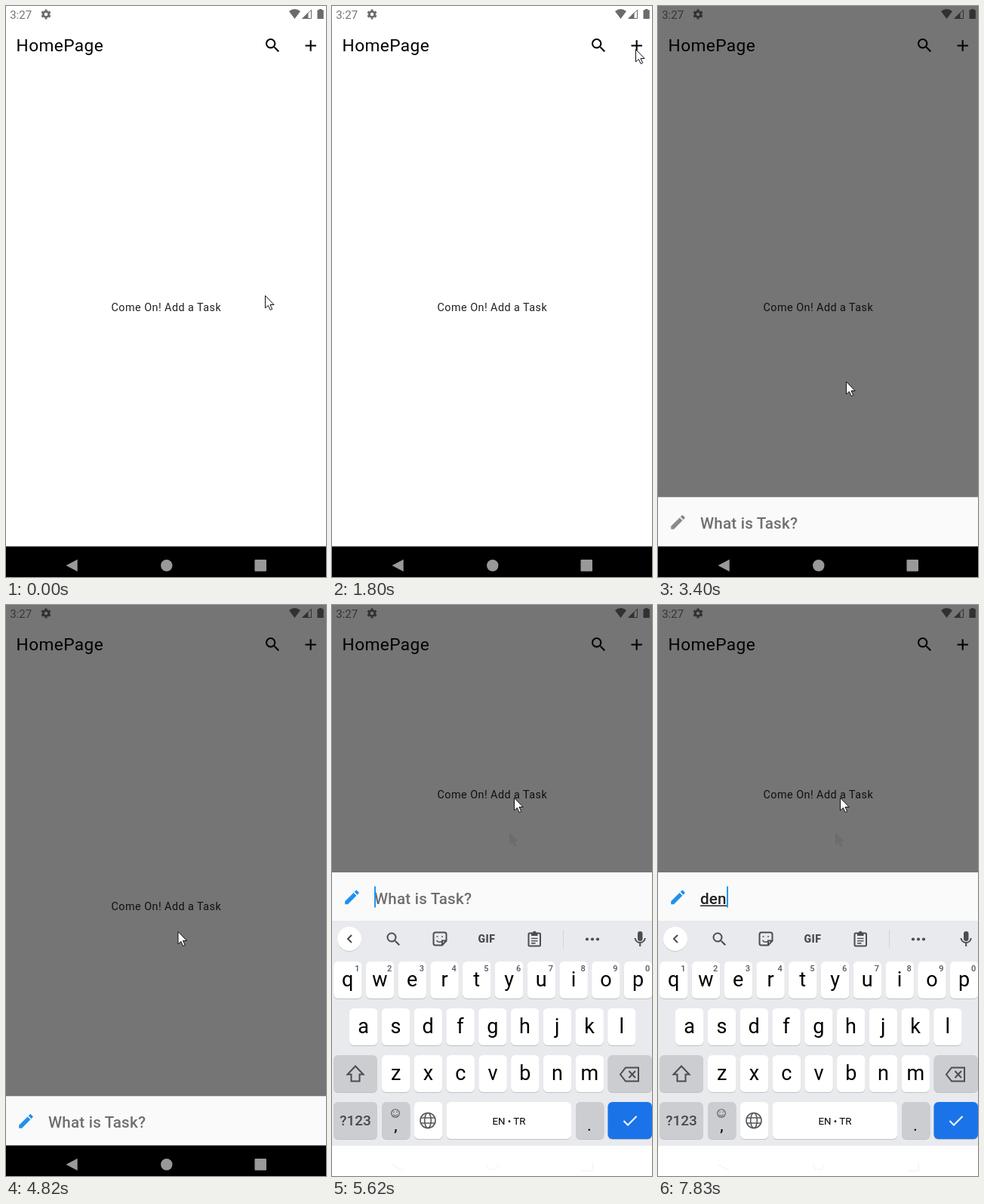
Animation of 424 by 756 pixels, one loop 8 s. Source, as an HTML page:

```html
<!DOCTYPE html>
<html lang="en">
<head>
<meta charset="utf-8">
<title>Add a task</title>
<style>
  html, body { margin: 0; width: 100%; height: 100%; overflow: hidden; background: #fff; }
  svg { display: block; width: 424px; height: 756px; font-family: Roboto, sans-serif; }
  .line { fill: none; stroke: #4a4d51; stroke-width: 2; }
  .thin { fill: none; stroke: #55585c; stroke-width: 1.6; }
  .mid { text-anchor: middle; }
</style>
</head>
<body>
<svg id="stage" viewBox="0 0 424 756">
  <defs>
    <path id="search" d="M15.5 14h-.79l-.28-.27A6.47 6.47 0 0 0 16 9.5 6.5 6.5 0 1 0 9.5 16c1.61 0 3.09-.59 4.23-1.57l.27.28v.79l5 4.99L20.49 19l-4.99-5zm-6 0a4.5 4.5 0 1 1 0-9 4.5 4.5 0 0 1 0 9z"/>
    <path id="arrow" d="M0 0V16.4L3.9 13 6.7 19 9.2 17.8 6.5 12H11.6Z"/>
  </defs>

  <rect width="424" height="756" fill="#fff"/>
  <g id="status" fill="#6b6b6b">
    <text x="5.2" y="17" font-size="15" fill="#757575">3:27</text>
    <g fill="none" stroke="#6b6b6b">
      <circle cx="53" cy="11" r="3.7" stroke-width="2.8"/>
      <circle cx="53" cy="11" r="5.6" stroke-width="2" pathLength="12" stroke-dasharray="1 1" stroke-dashoffset="-.5"/>
    </g>
    <path d="M375 7Q382.5 1.2 390 7L382.5 17Z"/>
    <path d="M392 17L400.500 8.500V17Z"/>
    <path d="M393.2 16.500L404.500 5.200V16.500Z" fill="none" stroke="#6b6b6b"/>
    <path d="M412.500 5.200H414.800V4H418.400V5.200H420.800V17H412.500Z"/>
  </g>
  <g id="bar">
    <text x="13.6" y="60" font-size="22.7" letter-spacing=".4">HomePage</text>
    <use href="#search" transform="translate(340.9 39.9) scale(1.03)"/>
    <path d="M396.500 52.500H411M403.700 45.300V59.700" stroke="#000" stroke-width="2.06"/>
  </g>
  <text id="empty" x="139.5" y="404" font-size="14.4" letter-spacing=".45" fill="#212121">Come On! Add a Task</text>

  <g id="modal">
    <rect id="shade" width="424" height="651" fill="#000" fill-opacity=".54"/>
    <use id="trail" href="#arrow" x="235" y="301" fill="#6c6c6c"/>
    <g id="sheet">
      <rect y="650.500" width="424" height="66" fill="#fafafa"/>
      <path id="pencil" transform="translate(14.1 671) scale(1.03)" d="M3 17.25V21h3.75L17.81 9.94l-3.75-3.75L3 17.25zM20.71 7.04c.39-.39.39-1.02 0-1.41l-2.34-2.34a1 1 0 0 0-1.41 0l-1.83 1.83 3.75 3.75 1.83-1.83z"/>
      <g font-size="20.6" font-weight="500" letter-spacing=".2">
        <text id="hint" x="56" y="692" fill="#6e6e6e">What is Task?</text>
        <g id="typed">
          <text x="56" y="692" fill="#212121">den</text>
          <rect x="56" y="694" width="35" height="1.5" fill="#212121"/>
        </g>
      </g>
      <rect id="caret" y="669" width="2" height="28" fill="#2196f3"/>
    </g>
  </g>

  <g id="keyboard"></g>

  <g id="navDark">
    <rect y="715.500" width="424" height="41"/>
    <g fill="#999">
      <path d="M79.500 740.700L94.700 732.700V748.700Z"/>
      <circle cx="212.800" cy="740.700" r="7.700"/>
      <rect x="329.500" y="733" width="15.500" height="15.500" rx="1"/>
    </g>
  </g>
  <g id="navLight">
    <rect y="716" width="424" height="40" fill="#fff"/>
    <path id="navEdge" d="M0 716H424" stroke="#d8d8d8" stroke-width="2"/>
    <path d="M79.500 741L94.500 749M205.500 742A7.500 7.500 0 0 0 220 742M330 749H345V738" fill="none" stroke="#f0f0f0"/>
  </g>

  <use id="pointer" href="#arrow" fill="#fff" stroke="#111"/>
</svg>
<script>
const LOOP = 8000;
const $ = id => document.getElementById(id);

// Pointer stops: time, x, y
const stops = [
  [0, 343.5, 383.5], [580, 312, 352], [780, 281.5, 262], [980, 293, 172],
  [1180, 334, 97], [1380, 412, 60], [1580, 410, 45.5], [1800, 402.5, 57.5],
  [2600, 385, 95], [2800, 320, 260], [3000, 265, 420], [3200, 250.5, 497.5],
  [3400, 249.5, 497.5], [3800, 232, 560], [4000, 195, 640], [4200, 176, 686],
  [4400, 180, 680], [4600, 205, 580], [4820, 228, 432.5], [5020, 232, 365],
  [5220, 234.5, 301.5], [5420, 241.5, 255.5]
];

const SHEET = 3400, FOCUS = 4600, NAV = 5420, KEYS = 5620, TYPED = 7830;
const caretOff = [[6220, 6620], [7230, TYPED]];

function key(x, y, w, fill = '#fff') {
  return `<rect x="${x}" y="${y + 1}" width="${w}" height="49" rx="6" fill="#bfc1c5"/>
    <rect x="${x}" y="${y}" width="${w}" height="49" rx="6" fill="${fill}"/>`;
}

function label(x, y, size, text, extra = '') {
  return `<text class="mid" x="${x}" y="${y}" font-size="${size}" ${extra}>${text}</text>`;
}

function row(letters, x0, y, numbered) {
  return [...letters].map((c, i) => {
    const x = x0 + i * 42.77;
    const digit = numbered
      ? label(x + 31.3, y + 12.5, 11, (i + 1) % 10, 'font-weight="500" fill="#55585c"') : '';
    return key(x, y, 37.5) + label(x + 18.7, y + 33, 27, c) + digit;
  }).join('');
}

function toolbar() {
  return `
    <circle cx="23" cy="443" r="16" fill="#c9cbcf"/>
    <circle cx="23" cy="442" r="16" fill="#fff"/>
    <path class="line" d="M26 437L21 442L26 447"/>
    <use href="#search" transform="translate(69.500 430.500)" fill="#4a4d51"/>
    <path class="line" d="M137 433.500H149A2.500 2.500 0 0 1 151.500 436V444.500L146 450.500H137A2.500 2.500 0 0 1 134.500 448V436A2.500 2.500 0 0 1 137 433.500ZM151 444.500H146V450"/>
    <path class="thin" d="M138.500 444Q141 447.500 145 445.500M138.500 439H140.500M145 439H147"/>
    ${label(205, 447, 14, 'GIF', 'font-weight="900" letter-spacing=".6" fill="#4a4d51"')}
    <rect class="line" x="260.500" y="434.500" width="15.500" height="17" rx="1.500"/>
    <path d="M264 434H272.500V438H264ZM266 434A2.200 2.200 0 0 1 270.500 434Z" fill="#4a4d51"/>
    <path class="thin" d="M264 441.500H272.500M264 444.700H272.500M264 447.900H269.500"/>
    <path d="M306.500 431V454" stroke="#d0d2d6"/>
    <g fill="#4a4d51">${[338, 345, 352].map(x => `<circle cx="${x}" cy="442.500" r="2.100"/>`).join('')}
      <rect x="405" y="432" width="6.500" height="13" rx="3.200"/></g>
    <path class="line" d="M401.500 441A6.700 6.700 0 0 0 414.800 441M408.200 448V452"/>`;
}

function bottomRow() {
  const y = 658, grey = '#cccdd1';
  return key(2, y, 58, grey) + label(31, 689, 19, '?123', 'font-weight="500" fill="#45484c"')
    + key(66, y, 37.5, grey) + label(84.500, 696, 22, ',')
    + `<circle cx="84" cy="673" r="5.300" class="thin" style="stroke-width:1.1"/>
       <path class="thin" style="stroke-width:1.1" d="M81.200 674.500Q84 678 86.800 674.500M82 670.500V672M86 670.500V672"/>`
    + key(109, y, 37.5)
    + `<g class="thin"><circle cx="127" cy="682.500" r="10"/>
       <ellipse cx="127" cy="682.500" rx="4.300" ry="10"/>
       <path d="M118 679H136M118 686H136"/></g>`
    + key(151.5, y, 165.5) + label(234.5, 687.5, 13.3, 'EN • TR')
    + key(323, y, 37.5, grey) + label(341, 696, 22, '.')
    + key(365.5, y, 58.5, '#1a73e8')
    + '<path d="M386.500 683L392 688.500L403.500 677" fill="none" stroke="#fff" stroke-width="2"/>';
}

$('keyboard').innerHTML =
  '<rect y="418" width="424" height="299" fill="#e8eaed"/>' + toolbar()
  + row('qwertyuiop', 2, 472, true)
  + row('asdfghjkl', 23, 534)
  + key(2, 596, 58, '#cccdd1') + row('zxcvbnm', 66, 596) + key(365.5, 596, 58.5, '#cccdd1')
  + `<path class="line" d="M31 610.500L41.500 621.500H36.500V630.500H25.500V621.500H20.500Z"/>
     <path class="line" d="M382 621.500L389 612.500H406V630.500H389ZM393.500 617L402 626M402 617L393.500 626"/>`
  + bottomRow();

const show = (id, on) => $(id).style.display = on ? '' : 'none';
const shift = (id, dy) => $(id).setAttribute('transform', `translate(0 ${dy})`);

function render(t) {
  const [, x, y] = stops.filter(s => s[0] <= t).pop();
  $('pointer').setAttribute('transform', `translate(${x} ${y})`);

  const keys = t >= KEYS, typed = t >= TYPED;
  show('modal', t >= SHEET);
  show('trail', t >= NAV);
  show('navDark', t < NAV);
  show('navLight', t >= NAV);
  show('navEdge', !keys);
  show('keyboard', keys);
  show('hint', !typed);
  show('typed', typed);
  show('caret', keys && !caretOff.some(([a, b]) => t >= a && t < b));

  shift('empty', keys ? -148 : 0);
  shift('sheet', keys ? -296.5 : 0);
  $('shade').setAttribute('height', keys ? 354 : 650.5);
  $('caret').setAttribute('x', typed ? 91 : 56);
  $('pencil').setAttribute('fill', t >= FOCUS ? '#2190ee' : '#8a8a8a');
}

const start = performance.now();
function tick() {
  render((performance.now() - start) % LOOP);
  requestAnimationFrame(tick);
}
tick();
</script>
</body>
</html>
```
